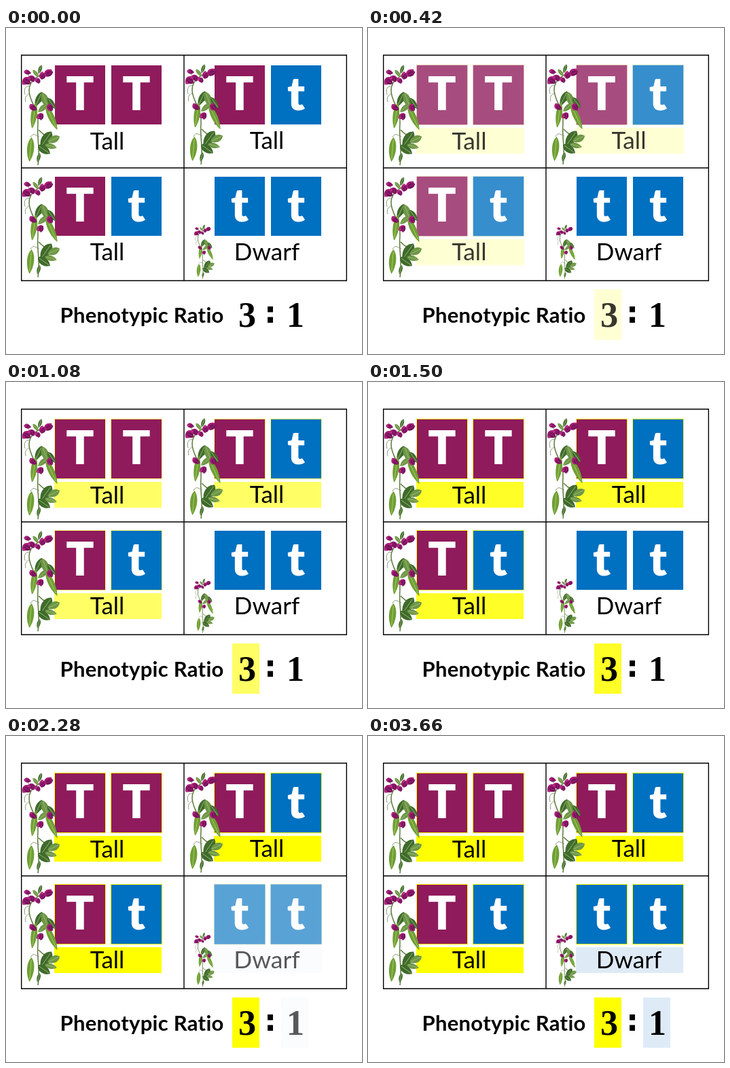
Animation of 524 by 480 pixels, one loop 3720 ms. Source, as an HTML page with a canvas:

```html
<!DOCTYPE html>
<html lang="en">
<head>
<meta charset="utf-8">
<title>Phenotypic Ratio</title>
<style>
html, body { margin: 0; width: 100%; height: 100%; overflow: hidden; background: #fff; }
canvas { display: block; }
</style>
</head>
<body>
<canvas id="stage" width="524" height="480"></canvas>
<script>
const ctx = document.getElementById('stage').getContext('2d');
const LOOP = 3720, STEP = 60;
const PURPLE = '#8f1b5c', BLUE = '#0070c0';
const YELLOW = [255, 255, 0], PALE_BLUE = [222, 235, 247];
const LABEL = '35px Carlito, Lato, sans-serif';
const LETTER = '900 68px Lato, sans-serif';
const TITLE = 'bold 31px Lato, sans-serif';
const DIGIT = 'bold 52px "Liberation Serif", "Times New Roman", serif';
const COLON = 'bold 45px "DejaVu Sans", sans-serif';

const tall = { pulseStart: 0, pulseTime: 460, fillStart: 50, fillTime: 1710, color: YELLOW };
const dwarf = { pulseStart: 1850, pulseTime: 500, fillStart: 1850, fillTime: 1700, color: PALE_BLUE };

const cells = [
  { genes: 'TT', label: 'Tall', x: 71, y: 55, base: 179, group: tall },
  { genes: 'Tt', label: 'Tall', x: 306, y: 55, base: 178, group: tall },
  { genes: 'Tt', label: 'Tall', x: 71, y: 219, base: 342, group: tall },
  { genes: 'tt', label: 'Dwarf', x: 306, y: 219, base: 342, group: dwarf }
];

const clamp = v => Math.max(0, Math.min(1, v));
const mixWhite = (rgb, k) => `rgb(${rgb.map(c => Math.round(255 + (c - 255) * k))})`;

function text(str, x, y, font, color = '#000', align = 'center', spacing = 0) {
  ctx.font = font;
  ctx.fillStyle = color;
  ctx.textAlign = align;
  ctx.letterSpacing = spacing + 'px';
  ctx.fillText(str, x, y);
}

// Runs draw() faded and enlarged about the centre of the given box.
function pulsed(group, t, x, y, w, h, draw) {
  const p = clamp((t - group.pulseStart) / group.pulseTime);
  const scale = 1 + 0.05 * (1 - Math.abs(2 * p - 1));
  const cx = x + w / 2, cy = y + h / 2;
  ctx.save();
  ctx.globalAlpha = 1 - 0.5 * Math.min(1, p / 0.2, (1 - p) / 0.2);
  ctx.translate(cx, cy);
  ctx.scale(scale, scale);
  ctx.translate(-cx, -cy);
  draw(clamp((t - group.fillStart) / group.fillTime));
  ctx.restore();
}

function highlight(group, t, x, y, w, h, str, textX, base, font) {
  pulsed(group, t, x, y, w, h, fill => {
    ctx.fillStyle = mixWhite(group.color, fill);
    ctx.fillRect(x, y, w, h);
    text(str, textX, base, font);
  });
}

function tile(group, t, x, y, gene) {
  pulsed(group, t, x, y, 75, 87, fill => {
    ctx.strokeStyle = mixWhite(YELLOW, fill);
    ctx.lineWidth = 1;
    ctx.strokeRect(x + 0.5, y - 0.5, 75, 88);
    ctx.fillStyle = gene === 'T' ? PURPLE : BLUE;
    ctx.fillRect(x + 1, y, 74, 87);
    ctx.globalAlpha = 1;
    text(gene, x + 38, y + 65.5, LETTER, '#fff');
  });
}

function drawCell({ genes, label, x, y, base, group }, t) {
  [...genes].forEach((gene, i) => tile(group, t, x + i * 83, y, gene));
  highlight(group, t, x, y + 92, 158, 38, label, x + 78, base, LABEL);
}

function curve(d, color, width) {
  ctx.strokeStyle = color;
  ctx.lineWidth = width;
  ctx.stroke(new Path2D(d));
}

function leaf(x, y, length, width, angle, color, vein) {
  const a = length / 2;
  ctx.save();
  ctx.translate(x, y);
  ctx.rotate(angle * Math.PI / 180);
  ctx.fillStyle = color;
  ctx.fill(new Path2D(`M0 ${-a}C${width} ${-a / 2} ${width * 0.7} ${a / 2} 0 ${a}C${-width * 0.7} ${a / 2} ${-width} ${-a / 2} 0 ${-a}`));
  curve(`M0 ${-a * 0.8}V${a * 0.8}`, vein, 0.8);
  ctx.restore();
}

const flowers = [[29, 78, 6], [37, 74, 5], [46, 77, 4], [53, 70, 5], [62, 66, 6], [31, 65, 4], [39, 117, 5], [64, 117, 5], [50, 130, 5]];
const leaves = [[50, 61, 14, 4, 20], [44, 67, 14, 4, -40], [48, 105, 24, 7, 25], [58, 107, 26, 8, -20], [67, 111, 20, 6, -35],
  [54, 118, 18, 6, 50], [59, 164, 28, 11, 35], [70, 164, 20, 8, 65], [56, 179, 22, 9, -55], [66, 174, 18, 6, -75], [48, 191, 14, 4, 15]];
const pods = [[41, 129, 38, 7, 8], [67, 132, 40, 7, -25], [36, 179, 36, 8, 5]];

function plant(x, y, scale) {
  ctx.save();
  ctx.translate(x, y);
  ctx.scale(scale, scale);
  ctx.translate(-24, -57);
  curve('M63 64C48 70 34 76 34 92C34 109 49 120 47 142C45 162 51 180 47 202M38 76L29 78M44 112L58 104L67 114M48 150C53 155 58 160 70 161', '#5c7a3a', 1.5);
  curve('M35 86C28 84 26 91 28 98M34 97C30 99 27 102 29 109M34 72L30 61M49 160C42 157 40 154 36 161', '#7f8f6c', 0.9);
  leaves.forEach((l, i) => leaf(...l, i % 2 ? '#6d9645' : '#3f6b2c', '#a3be7a'));
  pods.forEach(p => leaf(...p, '#6f9f35', '#b2d06d'));
  flowers.forEach(([fx, fy, r], i) => {
    leaf(fx, fy, r * 2.4, r * 1.3, 40 + i * 47, '#a81b76', '#cf4fa1');
    leaf(fx + 2, fy + 1, r * 2, r, 120 + i * 31, '#74135a', '#b0267f');
  });
  ctx.restore();
}

function draw(t) {
  ctx.fillStyle = '#fff';
  ctx.fillRect(0, 0, 524, 480);
  curve('M22.7 40H501.3V372H22.7ZM262 40V372M22 206H502', '#000', 1.4);

  cells.forEach(cell => drawCell(cell, t));
  plant(24, 57, 1);
  plant(264, 56, 1);
  plant(24, 222, 1);
  plant(277, 291, 0.54);

  text('Phenotypic Ratio', 79.5, 434, TITLE, '#000', 'left', 0.3);
  highlight(tall, t, 333, 385, 40, 74, '3', 355, 440, DIGIT);
  text(':', 389, 434, COLON);
  highlight(dwarf, t, 405, 385, 40, 74, '1', 426, 440, DIGIT);
}

function play() {
  draw(Math.floor(performance.now() % LOOP / STEP) * STEP);
  requestAnimationFrame(play);
}
play();
</script>
</body>
</html>
```
